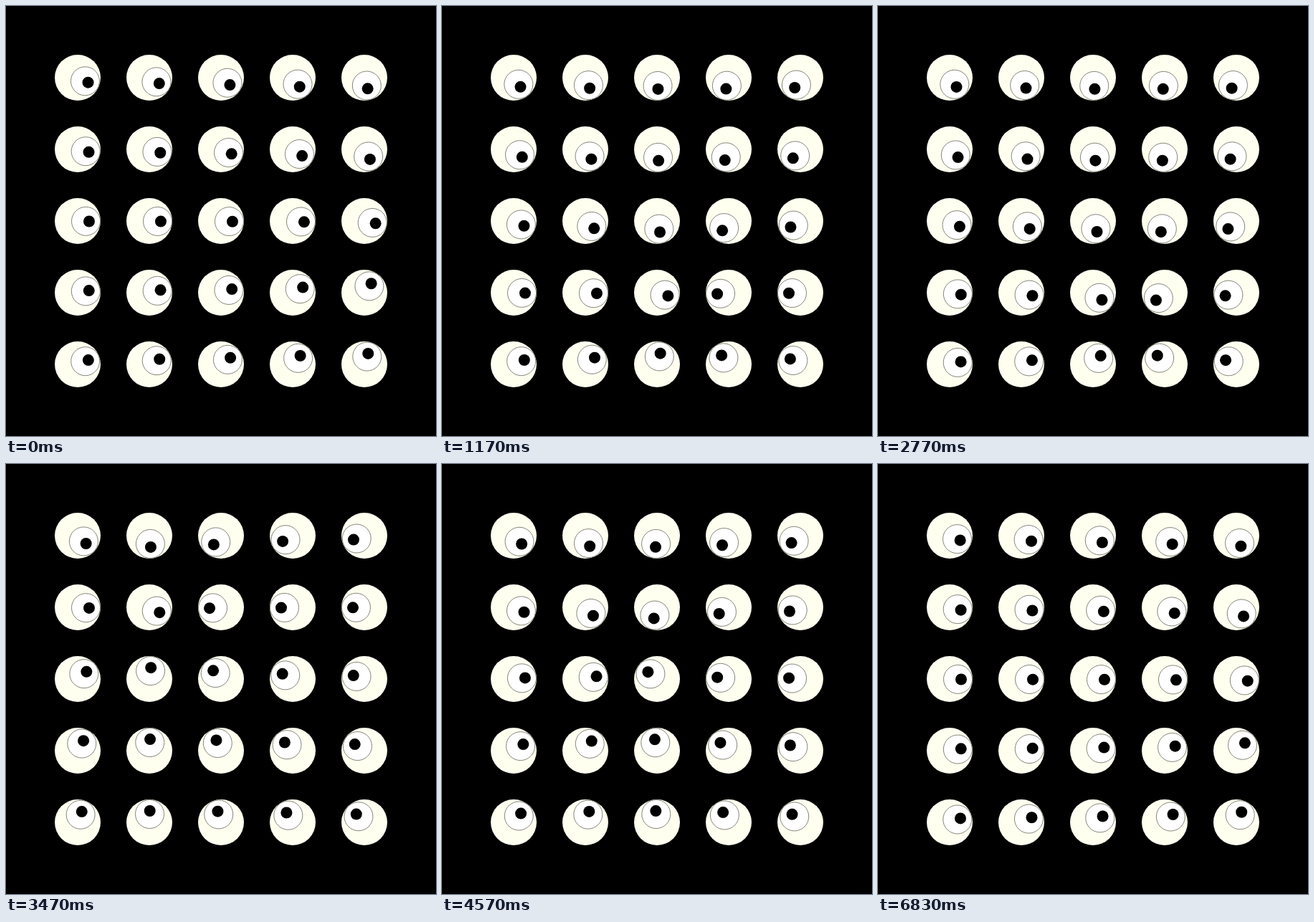
An HTML page with a canvas that plays this animation: 600x600 px, repeating every 6860 ms.

```html
<!DOCTYPE html>
<html lang="en">
<head>
<meta charset="utf-8">
<title>Watching eyes</title>
<style>
  html, body { margin: 0; width: 100%; height: 100%; overflow: hidden; background: #000; }
  canvas { display: block; width: 600px; height: 600px; }
</style>
</head>
<body>
<canvas id="stage" width="600" height="600"></canvas>
<script>
const ctx = document.getElementById('stage').getContext('2d');
const LOOP = 6860;
const FPS = 30;
const SIZE = 600;
const GAP = 100;

// Key points of the wandering gaze: time in ms and position.
const keys = [
  { t: 0, x: 565, y: 314 },
  { t: 1170, x: 328, y: 408 },
  { t: 2100, x: 110, y: 120 },
  { t: 2770, x: 352, y: 442 },
  { t: 3470, x: 213, y: 206.5 },
  { t: 4570, x: 277, y: 282 },
  { t: 5500, x: 331, y: 188 },
  { t: 6270, x: 90, y: 90 },
  { t: 6830, x: 594, y: 316 }
];

function slope(i, axis) {
  const a = keys[Math.max(i - 1, 0)];
  const b = keys[Math.min(i + 1, keys.length - 1)];
  return (b[axis] - a[axis]) / (b.t - a.t);
}

// Smooth cubic curve through the key points.
function gazeAt(time) {
  let i = 0;
  while (i < keys.length - 2 && keys[i + 1].t <= time) i++;
  const a = keys[i], b = keys[i + 1];
  const span = b.t - a.t;
  const u = Math.min(1, (time - a.t) / span);
  const v = 1 - u;
  const along = axis =>
    v * v * (1 + 2 * u) * a[axis] + u * u * (1 + 2 * v) * b[axis] +
    u * v * span * (v * slope(i, axis) - u * slope(i + 1, axis));
  return { x: along('x'), y: along('y') };
}

function disc(x, y, radius, fill, line) {
  ctx.beginPath();
  ctx.arc(x, y, radius, 0, Math.PI * 2);
  ctx.fillStyle = fill;
  ctx.fill();
  if (line) {
    ctx.strokeStyle = line;
    ctx.stroke();
  }
}

function drawEye(x, y, gaze) {
  const angle = Math.atan2(gaze.y - y, gaze.x - x);
  const dx = Math.cos(angle), dy = Math.sin(angle);
  disc(x, y, 32, '#fffff0');
  disc(x + 11.5 * dx, y + 11.5 * dy, 20, '#fff', '#77776c');
  disc(x + 16 * dx, y + 16 * dy, 8, '#000');
}

function draw(time) {
  // Each picture starts on a whole hundredth of a second.
  const tick = Math.floor((time % LOOP) / 10) * 10 + 5;
  const step = Math.floor(tick * FPS / 1000);
  const gaze = gazeAt(Math.round(step * 100 / FPS) * 10);
  ctx.fillStyle = '#000';
  ctx.fillRect(0, 0, SIZE, SIZE);
  ctx.lineWidth = 0.9;
  for (let y = GAP; y < SIZE; y += GAP) {
    for (let x = GAP; x < SIZE; x += GAP) drawEye(x, y, gaze);
  }
}

const start = performance.now();
function loop() {
  draw(performance.now() - start);
  requestAnimationFrame(loop);
}
loop();
</script>
</body>
</html>
```
